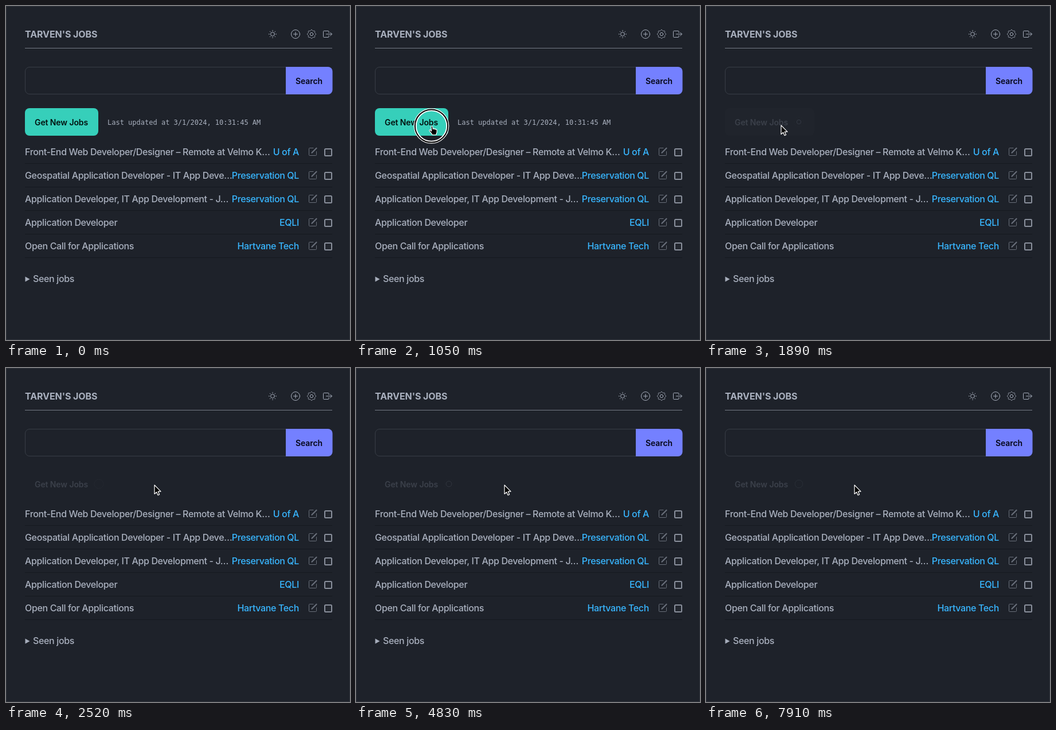
An HTML page for the animation above (8 s loop, 600x582 px).

```html
<!DOCTYPE html>
<html lang="en">
<head>
<meta charset="utf-8">
<title>Jobs</title>
<style>
  html, body { margin: 0; width: 100%; height: 100%; overflow: hidden; background: #1e222a; }
  svg { display: block; width: 100%; height: 100%; }
  text { font: 450 16px Inter, "Open Sans", sans-serif; letter-spacing: -.36px; fill: #a9b0be; white-space: pre; }
  .title { font-weight: 700; letter-spacing: -.1px; }
  .org { font-weight: 500; fill: #38b6ff; text-anchor: end; }
  .label { font-size: 14px; font-weight: 600; letter-spacing: -.1px; fill: #050617; }
  .stamp { font: 12px "DejaVu Sans Mono", monospace; letter-spacing: 0; }
  .icon { fill: none; stroke: #a6adbb; stroke-linecap: round; stroke-linejoin: round; }
  .edit { stroke: #6a707b; }
</style>
</head>
<body>
<svg viewBox="0 0 600 582">
  <rect width="600" height="582" fill="#1e222a"/>
  <rect x=".5" y=".5" width="599" height="581" fill="none" stroke="#30343c"/>

  <text class="title" x="33" y="55">TARVEN'S JOBS</text>
  <path d="M33 73.5H569" stroke="#747a85"/>
  <g class="icon">
    <g transform="translate(465 49)"><circle r="3.4"/><path id="rays"/></g>
    <g transform="translate(505 49)"><circle r="7.5"/><path d="M-3.5 0h7M0-3.5v7"/></g>
    <g transform="translate(533 49)"><circle r="2.7"/><path id="gear"/></g>
    <path transform="translate(553 41)" d="M10 5.5v-2a1 1 0 0 0-1-1H1.5a1 1 0 0 0-1 1v9a1 1 0 0 0 1 1H9a1 1 0 0 0 1-1v-2M5.5 8h10M12.500 5l3 3-3 3"/>
  </g>

  <rect x="33.5" y="106.5" width="535" height="47" rx="7.5" fill="none" stroke="#383d46"/>
  <path d="M488 106h73.500a8 8 0 0 1 8 8v32a8 8 0 0 1-8 8H488z" fill="#7480ff"/>
  <text class="label" x="505" y="136">Search</text>

  <g id="button">
    <rect id="face" x="33" y="178" width="128" height="48" rx="8"/>
    <text id="caption" class="label" x="50" y="208">Get New Jobs</text>
  </g>
  <g id="spinner" fill="none" stroke="#3b404a" stroke-width=".95">
    <circle cx="162" cy="202"/><circle cx="162" cy="202"/>
  </g>
  <text id="stamp" class="stamp" x="177" y="207">Last updated at 3/1/2024, 10:31:45 AM</text>

  <g id="rows"></g>
  <path d="M33.5 471.5v9l8-4.5z" fill="#a6adbb"/>
  <text x="47" y="481">Seen jobs</text>

  <g id="ring" fill="none">
    <circle r="28.5" stroke="#000" stroke-width="4"/>
    <circle r="30.2" stroke="#fff" stroke-width="1.2"/>
    <circle r="26.7" stroke="#fff" stroke-width="1.8"/>
  </g>
  <g id="cursor" stroke="#fff" stroke-width="1.2" stroke-linejoin="round">
    <path id="arrow" d="M0 0V15.5L3.6 12.2 6 17.6 8.6 16.5 6.2 11.2H11z"/>
    <path id="hand" d="M0 2.5c0-2 2.5-2 2.7 0l.5 4c.4-1.3 2.3-1.2 2.5.2.5-1 2.2-.7 2.4.6.6-.8 2-.3 2 .9v3.3c0 2-1.4 2.8-1.4 5H2c-.4-2-3.3-4.3-4.8-6.8-.8-1.6 1-2.3 2-1.2l1.4 1.5z"/>
  </g>
</svg>
<script>
const LOOP = 8000, PRESS = 1610, BUSY = 1715, RING_PERIOD = 1890;
const $ = id => document.getElementById(id);
const clamp = x => Math.max(0, Math.min(1, x));
const span = (t, a, b) => clamp((t - a) / (b - a));
const mix = (a, b, k) => a + (b - a) * k;
const smooth = k => k * k * (3 - 2 * k);
const blend = (a, b, k) => `rgb(${a.map((v, i) => Math.round(mix(v, b[i], k)))})`;
const polar = (r, a) => `${(r * Math.sin(a)).toFixed(2)} ${(-r * Math.cos(a)).toFixed(2)}`;
const show = (id, on) => $(id).style.display = on ? 'inline' : 'none';

// cubic-bezier easing, solved by bisection
function bezier(x1, y1, x2, y2) {
  const at = (u, a, b) => 3 * (1 - u) ** 2 * u * a + 3 * (1 - u) * u * u * b + u ** 3;
  return x => {
    let lo = 0, hi = 1;
    for (let i = 0; i < 20; i++) {
      const m = (lo + hi) / 2;
      if (at(m, x1, x2) < x) lo = m; else hi = m;
    }
    return at(lo, y1, y2);
  };
}
const grow = bezier(.165, .84, .44, 1), fade = bezier(.3, .61, .355, 1);

const turns = n => Array.from({ length: n }, (_, i) => i * 2 * Math.PI / n);
$('rays').setAttribute('d', turns(8).map(a => `M${polar(5.6, a)}L${polar(6.7, a)}`).join(''));
$('gear').setAttribute('d', 'M' + turns(96).map(a => polar(6.8 + .75 * Math.cos(8 * a), a)).join('L') + 'z');

const jobs = [
  ['Front-End Web Developer/Designer – Remote at Velmo K…', 'U of A'],
  ['Geospatial Application Developer - IT App Deve…', 'Preservation QL'],
  ['Application Developer, IT App Development - J…', 'Preservation QL'],
  ['Application Developer', 'EQLI'],
  ['Open Call for Applications', 'Hartvane Tech']
];
$('rows').innerHTML = jobs.map(([job, org], i) => `
  <g transform="translate(0 ${41 * i})">
    <text x="33" y="260">${job}</text>
    <text class="org" x="511" y="260">${org}</text>
    <g class="icon edit" transform="translate(527 246)">
      <path d="M9 1.5H2.5a1 1 0 0 0-1 1v11a1 1 0 0 0 1 1h11a1 1 0 0 0 1-1V7.5"/>
      <path d="M14.500 1.700L6.500 9.700" stroke-width="2.2"/>
    </g>
    <rect x="556" y="249" width="12" height="12" rx="1.5" fill="#23272f" stroke="#8a909c" stroke-width="2"/>
    <path d="M33 274.5H569" stroke="#15191f"/>
  </g>`).join('');

function draw(t) {
  const busy = t >= BUSY, off = span(t, BUSY, BUSY + 160), press = span(t, PRESS, PRESS + 60);

  const scale = busy ? 1 : mix(1, .97, press);
  $('button').setAttribute('transform', `translate(97 202) scale(${scale}) translate(-97 -202)`);
  $('face').setAttribute('width', busy ? 156 : 128);
  $('face').setAttribute('fill', busy
    ? blend([43, 180, 162], [33, 37, 45], fade(off))
    : blend([54, 207, 186], [43, 180, 162], press));
  $('face').setAttribute('opacity', 1 - span(t, BUSY + 160, BUSY + 300));
  $('caption').style.fill = blend([1, 16, 14], [59, 64, 74], off);
  show('stamp', !busy);

  show('spinner', busy);
  [...$('spinner').children].forEach((c, i) => {
    const p = ((t - BUSY + i * RING_PERIOD / 2) / RING_PERIOD % 1 + 1) % 1;
    c.setAttribute('r', mix(1, 20, grow(p)) * 20 / 44);
    c.setAttribute('stroke-opacity', 1 - fade(p));
  });

  const enter = smooth(span(t, 0, 840)), leave = smooth(span(t, 2260, 2520));
  const x = mix(mix(290, 131, enter), 259, leave), y = mix(mix(588, 208, enter), 204, leave);
  const over = x < 161 && y < 226 && t < PRESS;
  $('cursor').setAttribute('transform', `translate(${x} ${y})`);
  show('arrow', !over);
  show('hand', over);

  const pop = span(t, 940, 1040);
  $('ring').setAttribute('transform', `translate(131.5 209) scale(${mix(.6, 1, pop)})`);
  $('ring').setAttribute('opacity', pop * (1 - span(t, 1120, 1260)));
}

const start = performance.now();
function tick() {
  draw((performance.now() - start) % LOOP);
  requestAnimationFrame(tick);
}
tick();
</script>
</body>
</html>
```
